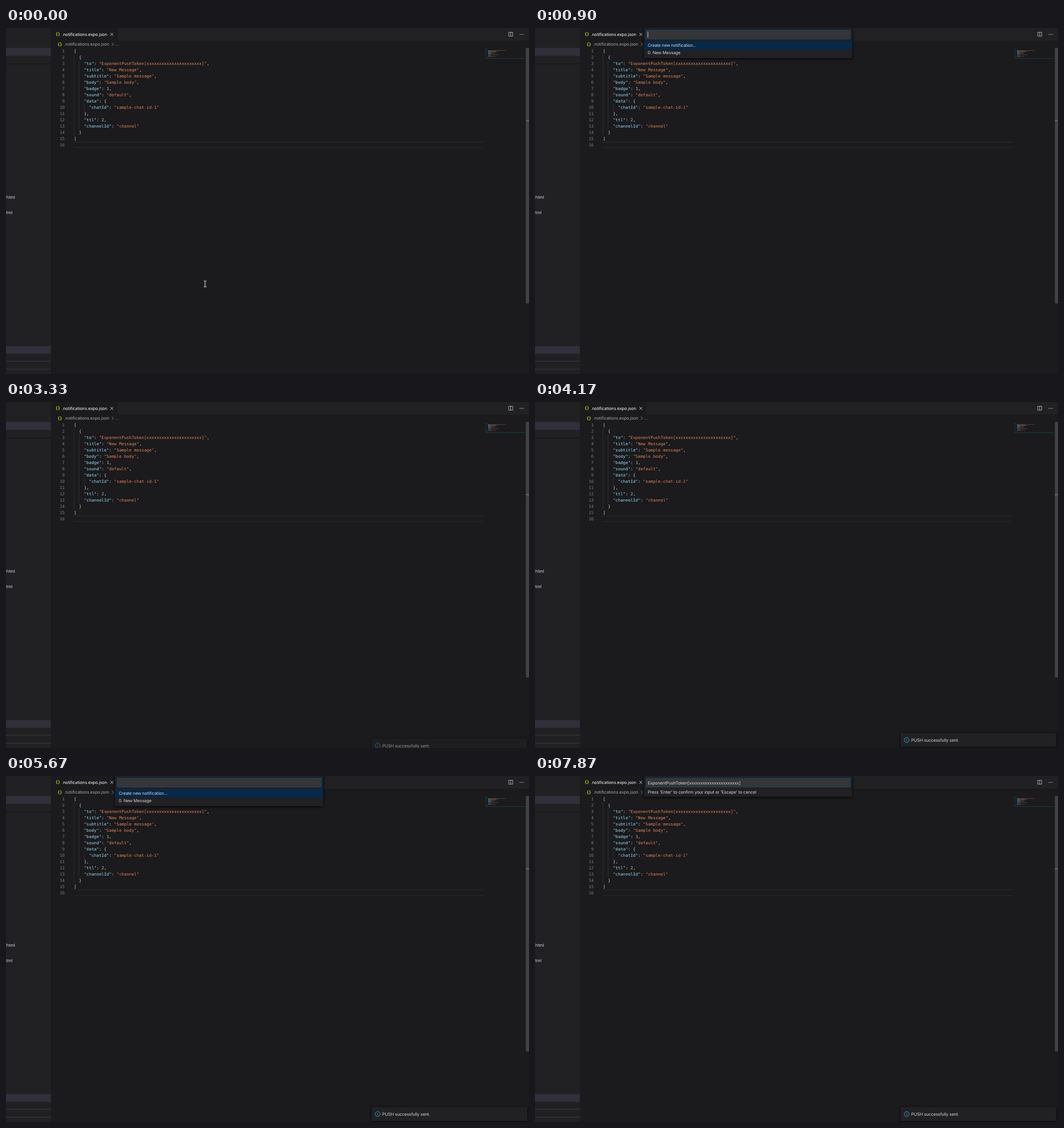
Recreate the animation shown at these times as an HTML page. Size 920x608 px, loop 8000 ms.

```html
<!DOCTYPE html>
<html lang="en">
<head>
<meta charset="utf-8">
<title>Push notifications in the editor</title>
<style>
  html, body { margin: 0; width: 100%; height: 100%; overflow: hidden; background: #1b1a1c; }
  svg { display: block; width: 920px; height: 608px; }
  text { font: 7.6px Inter, sans-serif; letter-spacing: -.16px; fill: #d4d3d5; text-rendering: geometricPrecision; }
  .code text, .brace { font: 7.32px "DejaVu Sans Mono", monospace; letter-spacing: 0; }
  .brace { font-weight: bold; fill: #c3cf22; letter-spacing: -.4px; }
  .float { filter: drop-shadow(0 1.5px 2px #000); }
</style>
</head>
<body>
<svg id="stage" viewBox="0 0 920 608"></svg>
<script>
const LOOP = 8000;
const C = {
  bg: '#1b1a1c', panel: '#212023', row: '#302f3a', line: '#38373a', guide: '#39383a',
  key: '#94dcfb', str: '#d88662', num: '#b5cea8', punct: '#d4d4d4', dim: '#7f7e80',
  focus: '#04294a', input: '#363538', border: '#0d4b73', caret: '#c8c8c8'
};
const stage = document.getElementById('stage');

function el(parent, tag, attrs = {}, text) {
  const node = document.createElementNS('http://www.w3.org/2000/svg', tag);
  for (const k in attrs) node.setAttribute(k, attrs[k]);
  if (text !== undefined) node.textContent = text;
  parent.appendChild(node);
  return node;
}
const group = (parent, attrs) => el(parent, 'g', attrs);
const rect = (parent, x, y, width, height, fill, more) => el(parent, 'rect', { x, y, width, height, fill, ...more });
const label = (parent, x, y, text, more) => el(parent, 'text', { x, y, ...more }, text);
const stroke = (parent, d, color, width = 0.8) =>
  el(parent, 'path', { d, fill: 'none', stroke: color, 'stroke-width': width });
const show = (node, on) => node.setAttribute('visibility', on ? 'visible' : 'hidden');

function drawFrame() {
  rect(stage, 0, 0, 920, 608, C.bg);
  rect(stage, 0, 0, 920, 22, C.panel);
  rect(stage, 79, 0, 117, 22, C.bg);

  // Side bar
  rect(stage, 0, 0, 79, 608, C.panel);
  rect(stage, 0, 35, 79, 14, C.row);
  rect(stage, 0, 62, 79, 2, '#19181a');
  rect(stage, 0, 559, 79, 13.5, C.row);
  rect(stage, 0, 585, 79, 1, C.line);
  rect(stage, 0, 599, 79, 1, C.line);
  label(stage, 0.8, 299.8, 'html');
  label(stage, 0.6, 326.8, 'tml');

  // Tab and breadcrumb
  label(stage, 87, 13.4, '{}', { class: 'brace' });
  label(stage, 98.5, 13.9, '.notifications.expo.json', { fill: '#fff', style: 'fill:#f6f6f6' });
  stroke(stage, 'M183.7 8.7l5 5m0-5l-5 5', '#d0d0d0', 0.9);
  label(stage, 90.5, 30.8, '{}', { class: 'brace' });
  label(stage, 102.3, 31.1, '.notifications.expo.json', { style: 'fill:#a3a2a4' });
  stroke(stage, 'M186.4 25.8l2.5 2.8l-2.5 2.8', '#a3a2a4', 0.8);
  label(stage, 192.7, 31.1, '...', { style: 'fill:#a3a2a4' });

  // Editor actions
  stroke(stage, 'M884.3 7.5h7v6.8h-7zM887.8 7.5v6.8', '#c4c3c5');
  for (let i = 0; i < 3; i++) el(stage, 'circle', { cx: 904.4 + i * 2.8, cy: 11.3, r: 0.75, fill: '#c4c3c5' });

  rect(stage, 914.5, 35, 5.5, 449, '#434244');
  rect(stage, 914.5, 162.5, 5.5, 1, '#8b8a8c');
}

const LINES = [
  '[', '  {', '    "to": "ExponentPushToken[' + 'x'.repeat(22) + ']",',
  '    "title": "New Message",', '    "subtitle": "Sample message",', '    "body": "Sample body",',
  '    "badge": 1,', '    "sound": "default",', '    "data": {', '      "chatId": "sample-chat-id-1"',
  '    },', '    "ttl": 2,', '    "channelId": "channel"', '  }', ']', ''
];
const CHAR = 4.407, LEFT = 119.6, PITCH = 11;

function drawCode() {
  const code = group(stage, { class: 'code' });
  rect(code, 119, 200, 721, 1, '#29282a');
  rect(code, 119, 209.5, 721, 1, '#29282a');
  rect(code, 119.4, 46, 0.7, 143, C.guide);
  rect(code, 128.2, 57, 0.7, 121, C.guide);
  rect(code, 137, 134, 0.7, 11, C.guide);

  LINES.forEach((src, i) => {
    const y = 42.8 + i * PITCH;
    label(code, 103.2, y, i + 1, { 'text-anchor': 'end', style: `fill:${C.dim}` });
    for (const m of src.matchAll(/"[^"]*"|\d+|[^\s"\d]+/g)) {
      const s = m[0];
      const isKey = s[0] === '"' && src[m.index + s.length] === ':';
      const color = isKey ? C.key : s[0] === '"' ? C.str : /\d/.test(s) ? C.num : C.punct;
      label(code, LEFT + m.index * CHAR, y, s, { style: `fill:${color}` });
      rect(code, 845.5 + m.index * 0.61, 37 + i * 1.05, s.length * 0.61, 0.75, color, { opacity: 0.42 });
    }
  });
  stroke(code, 'M844 36v17.6h70', '#174650', 0.8);
}

function makePopup(height) {
  const g = group(stage);
  rect(g, 191.5, -4, 366.5, height + 4, C.panel, { class: 'float' });
  rect(g, 195.4, 4, 359.2, 15.4, C.input, { stroke: C.border, 'stroke-width': 0.9 });
  return g;
}

const rowY = i => 23.5 + i * 13.5;
const option = (g, i, text) => label(g, 198.2, rowY(i) + 9.3, text);

const COMMANDS = [
  'Expo Push: Send notification', 'Developer: Reload Window', 'Preferences: Open Settings (JSON)',
  'Format Document', 'Add Cursor Above', 'Add Cursor Below', 'Add Line Comment', 'Change Language Mode',
  'Clear Editor History', 'Close All Editors', 'Convert Indentation to Spaces', 'Copy Path of Active File',
  'Debug: Add Function Breakpoint', 'File: Compare Active File With...', 'File: Save All',
  'Fold All', 'Git: Checkout to...', 'Go to Definition'
];

function makePalette() {
  const g = makePopup(24);
  label(g, 198.2, 14.4, '>');
  const list = group(g);
  rect(list, 191.5, 20.5, 366.5, 248, C.panel, { class: 'float' });
  rect(list, 191.5, rowY(0), 366.5, 13.5, C.focus);
  COMMANDS.forEach((name, i) => option(list, i, name));
  const hint = { 'text-anchor': 'end', style: 'fill:#3f90c4;font-size:6.6px' };
  label(list, 540, rowY(0) + 9.1, 'recently used', hint);
  label(list, 540, rowY(4) + 9.1, 'other commands', hint);
  rect(list, 191.5, rowY(4), 366.5, 0.6, C.line);
  return { g, list };
}

function makePicker() {
  const g = makePopup(53);
  const focus = rect(g, 191.5, rowY(0), 366.5, 13.5, C.focus);
  option(g, 0, 'Create new notification...');
  option(g, 1, '0. New Message');
  return { g, focus };
}

function makePrompt() {
  const g = makePopup(36.5);
  const hint = label(g, 198.2, 14.6, 'To (Expo push token from your app) [required]', { style: 'fill:#929193' });
  const value = label(g, 198.2, 14.6, 'ExponentPushToken[' + 'x'.repeat(22) + ']');
  label(g, 198.2, 30.6, "Press 'Enter' to confirm your input or 'Escape' to cancel");
  return { g, hint, value };
}

function makeToast() {
  const g = group(stage);
  rect(g, 643, 581.5, 274, 25, C.panel, { class: 'float' });
  el(g, 'circle', { cx: 653.8, cy: 594, r: 4.3, fill: 'none', stroke: '#3ba4d4', 'stroke-width': 0.9 });
  rect(g, 653.4, 593.3, 0.9, 3, '#3ba4d4');
  rect(g, 653.4, 591.6, 0.9, 0.9, '#3ba4d4');
  label(g, 661.8, 596.8, 'PUSH successfully sent.');
  return g;
}

function makePointer() {
  const g = group(stage);
  const d = 'M347.8 444.5q2.4 0 2.4 1.6q0-1.6 2.4-1.6M350.2 446v7M347.8 454.5q2.4 0 2.4-1.6q0 1.6 2.4 1.6M348.8 449.5h2.8';
  stroke(g, d, '#c9c9c9', 2);
  stroke(g, d, '#171618', 0.7);
  return g;
}

drawFrame();
drawCode();
const toast = makeToast();
const palette = makePalette();
const picker = makePicker();
const prompt = makePrompt();
const pointer = makePointer();
const inputCaret = rect(stage, 0, 6.5, 0.9, 10.2, C.caret);
const codeCaret = rect(stage, 119.4, 200, 1.2, 10.6, C.caret);

// Caret spans: start, end, x
const INPUT_CARET = [
  [130, 630, 203.2], [900, 1400, 198.2], [1900, 2400, 198.2], [4400, 4900, 203.2],
  [5170, 5670, 198.2], [6100, 6600, 198.2], [7100, 7370, 198.2], [7370, 7870, 361.2]
];
const CODE_CARET = [[2670, 3170], [3670, 4170], [6070, 6100]];

const within = (t, spans) => spans.find(([a, b]) => t >= a && t < b);
const easeOut = p => 1 - (1 - p) ** 2;
const toggle = (node, on) => node.setAttribute('display', on ? 'inline' : 'none');

function render(t) {
  toggle(palette.g, within(t, [[130, 870], [4400, 5170]]));
  toggle(palette.list, within(t, [[170, 870], [4440, 5170]]));
  toggle(picker.g, within(t, [[900, 2670], [5170, 6070]]));
  picker.focus.setAttribute('y', rowY(within(t, [[2000, 2670]]) ? 1 : 0));
  toggle(prompt.g, t >= 6100);
  toggle(prompt.hint, t < 7370);
  toggle(prompt.value, t >= 7370);
  show(pointer, t < 870);

  const rise = easeOut(Math.min(1, Math.max(0, (t - 3200) / 330)));
  show(toast, rise > 0);
  toast.setAttribute('opacity', rise);
  toast.setAttribute('transform', `translate(0 ${(1 - rise) * 27})`);

  const caret = within(t, INPUT_CARET);
  show(inputCaret, caret);
  if (caret) inputCaret.setAttribute('x', caret[2]);
  show(codeCaret, within(t, CODE_CARET));
}

const start = performance.now();
function tick() {
  render((performance.now() - start) % LOOP);
  requestAnimationFrame(tick);
}
tick();
</script>
</body>
</html>
```
